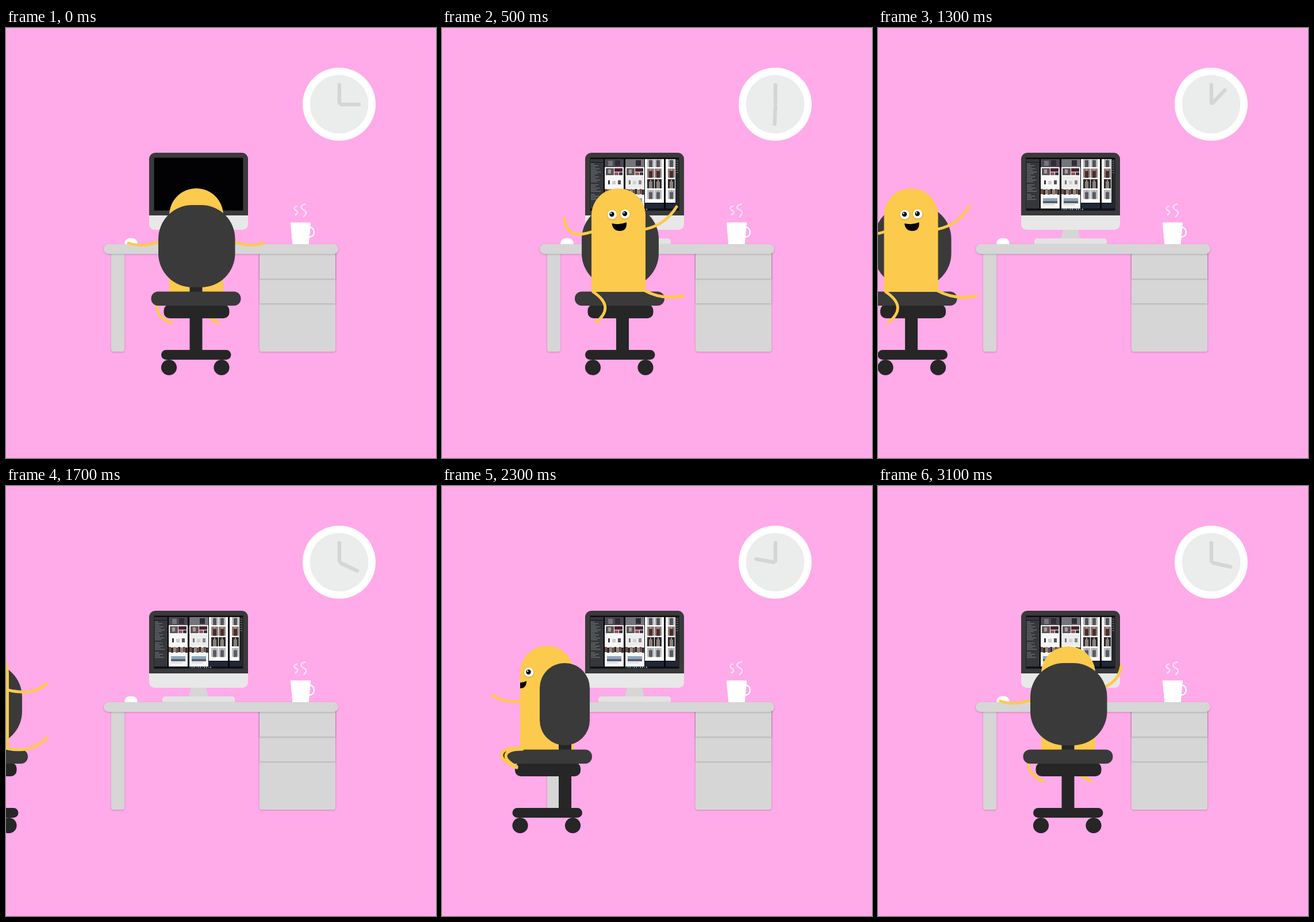
Animation of 748 by 748 pixels, one loop 3200 ms. Source, as an HTML page:

```html
<!DOCTYPE html>
<html lang="en">
<head>
<meta charset="utf-8">
<title>Leaving the desk</title>
<style>
  html, body { margin: 0; height: 100%; overflow: hidden; background: #ffaae9; }
  svg { display: block; }
  #stage { width: 100%; height: 100%; }
  .shadow { filter: drop-shadow(0 1.5px 1.5px rgba(0, 0, 0, .22)); }
  .grey { fill: #d6d6d6; }
  .dark { fill: #3a3a3a; }
  .black { fill: #262626; }
  .skin { fill: #fcca4c; }
  .limb { fill: none; stroke: #fcca4c; stroke-width: 5; stroke-linecap: round; }
  .hand { stroke: #d5d5d5; stroke-width: 6.5; stroke-linecap: round; }
  .steam { fill: none; stroke: #fff; stroke-opacity: .6; stroke-width: 2.6; stroke-linecap: round; }
</style>
</head>
<body>
<svg id="stage" viewBox="0 0 748 748">
  <defs>
    <g id="base" class="black">
      <rect x="-56" y="481" width="114" height="24" rx="10"/>
      <rect x="-60.5" y="560" width="121.5" height="17" rx="8.5"/>
      <circle cx="-47" cy="590.5" r="13.6"/>
      <circle cx="44.5" cy="590.5" r="13.6"/>
    </g>
    <g id="eye">
      <circle r="8" fill="#fff" class="shadow"/>
      <circle cx="-.5" cy="-.5" r="4.2"/>
      <circle cx="-2" cy="-2" r="1.3" fill="#fff"/>
    </g>
  </defs>

  <!-- clock -->
  <circle cx="579.5" cy="132.5" r="63.5" fill="#fff"/>
  <circle cx="579.5" cy="132.5" r="50.8" fill="#ebecec"/>
  <path class="hand" d="M580 99V130"/>
  <path class="hand" id="hour" d="M580 130V99"/>

  <!-- monitor -->
  <rect class="dark" x="249" y="217" width="172" height="130" rx="11"/>
  <path d="M249 326H421V340Q421 351 410 351H260Q249 351 249 340Z" fill="#e8e8e8"/>
  <path d="M322 351H348L352 367H318Z" fill="#d6d6d6"/>
  <rect x="272" y="366" width="126" height="14" rx="5" fill="#e3e3e3"/>
  <rect x="257.5" y="225.5" width="155" height="92" rx="1" fill="#020204" stroke="#222"/>
  <svg id="screen" x="258" y="226" width="154" height="91"></svg>

  <!-- desk, mouse and cup -->
  <path d="M206 377Q206 365.500 217.500 365.500T229 377Z" fill="#fff"/>
  <rect class="grey shadow" x="183" y="385" width="23" height="178" rx="4"/>
  <rect class="grey shadow" x="441" y="385" width="132" height="178" rx="4"/>
  <rect class="grey shadow" x="441" y="385" width="132" height="94"/>
  <rect class="grey shadow" x="441" y="385" width="132" height="51"/>
  <rect class="grey shadow" x="170" y="376" width="408" height="17" rx="8.5"/>
  <path d="M495 338.500H530L526.500 376H498.500Z" fill="#fff"/>
  <ellipse cx="528.500" cy="355" rx="7.5" ry="8.5" fill="none" stroke="#fff" stroke-width="2.4"/>
  <path d="M495 338.500H530L526.500 376H498.500Z" fill="#fff"/>
  <path class="steam" d="M506 310C501 311 500 315 504 317S509 322 503.500 325"/>
  <path class="steam" d="M521 306.500C513 307 511 313 517 316S524 322 518 328"/>

  <g id="back">
    <path class="limb" d="M262 484Q263 504 287 513M354 504L369 513"/>
    <path class="skin" d="M284 459V326A47 47 0 0 1 378 326V459Z"/>
    <path class="limb" d="M268 371Q240 383 213 374"/>
    <path class="limb" id="rightArm"/>
    <rect class="black" x="319.500" y="448" width="22" height="115"/>
    <rect class="dark" x="265" y="308" width="133.500" height="143" rx="59"/>
    <use href="#base" x="330.5"/>
    <rect class="dark" x="252.500" y="458.500" width="156" height="24.500" rx="12"/>
  </g>

  <g id="front">
    <rect class="dark" x="243" y="308" width="134" height="143" rx="59"/>
    <rect class="black" id="frontPole" y="448" width="22" height="115"/>
    <use href="#base" x="309.5"/>
    <rect class="dark" x="231" y="458.500" width="156" height="24.500" rx="12"/>
    <path class="skin" d="M260 459V326A47 47 0 0 1 354 326V459Z"/>
    <path class="limb" id="frontLimbs"/>
    <use href="#eye" x="296" y="324.500"/>
    <use href="#eye" x="318.500" y="323.500"/>
    <path d="M295.500 340Q309 343 321 338Q322 353 309.500 353Q297 353 295.500 340Z"/>
  </g>

  <g id="side">
    <path class="limb" d="M138 375Q109 378 88 364"/>
    <path class="skin" d="M136 465V324.500A46.500 46.500 0 0 1 229 324.500V465Z"/>
    <use href="#eye" x="151" y="324"/>
    <path d="M136 342Q142 342 147 339Q147 352 136 352Z"/>
    <rect class="black" x="203" y="448" width="22" height="115"/>
    <rect class="dark" x="170" y="308" width="87" height="143" rx="43.500"/>
    <use href="#base" x="183"/>
    <rect class="dark" x="106" y="458.500" width="155" height="24.500" rx="12"/>
    <path class="limb" d="M140 456C92 454 94 475 130 490M140 458C106 457 101 474 130 488"/>
  </g>
</svg>

<script>
const byId = id => document.getElementById(id);

// Design software on the monitor, in coordinates of the screen
function screenArt() {
  let art = '';
  const box = (x, y, w, h, fill) => {
    art += `<rect x="${x}" y="${y}" width="${w}" height="${h}" fill="${fill}"/>`;
  };
  box(0, 1, 23, 87, '#35373b');
  box(0, 7, 23, 1, '#17181a');
  for (let i = 0; i < 23; i++) {
    if (i === 12 || i === 18) continue;
    box(1, 10 + i * 2.8, 6 + (i * 7) % 12, 1, '#7e8185');
  }
  box(148, 1, 6, 87, '#25272b');
  for (let i = 0; i < 6; i++) box(149, 5 + i * 4, 4, 1, '#777');

  const page = (x, photo) => {
    box(x, 2, 33, 86, '#f7f7f7');
    box(x, 2, 33, 14, photo);
    box(x + 6, 5, 8, 9, '#77737a');
    box(x + 18, 4, 9, 10, '#302d35');
    box(x + 2, 18, 14, 12, '#57565c');
    box(x + 6, 20, 5, 7, '#b29a92');
    box(x + 17, 18, 14, 6, '#4c2434');
    box(x + 17, 25, 7, 5, '#99555b');
    box(x + 25, 25, 6, 5, '#333744');
    box(x + 6, 39, 3, 7, '#35353b');
    box(x + 13, 40, 6, 6, '#ccc');
    box(x + 23, 39, 5, 7, '#51515a');
    for (let i = 0; i < 8; i++)
      box(x + i * 4.1, 54 + i % 2, 4, 9, ['#6c4d44', '#292a32', '#9b8172'][i % 3]);
    box(x + 4, 70, 25, 9, '#8ea6bd');
    box(x + 4, 75, 25, 4, '#59606b');
    box(x + 4, 81, 20, 1, '#bbb');
  };
  page(25, '#4d4853');
  page(61, '#77747c');
  box(61, 32, 33, 20, '#d9d9d966');

  const shop = (x, width, columns) => {
    box(x, 2, width, 76, '#fff');
    box(x, 79, width, 9, '#202838');
    const tones = ['#b7b9bc', '#8b7c78', '#292a2b', '#b8bdc1'];
    tones.forEach((tone, row) => {
      for (let column = 0; column < columns; column++) {
        const left = x + 4 + column * 13, top = 18.5 * row;
        box(left, top, 12, 16, tone);
        box(left + 3, top + 4, 6, 12, ['#55535a', '#4a2b2b', '#8a817b', '#5b5a61'][row]);
        box(left + 5, top + 1, 2, 3, '#bb9486');
      }
    });
  };
  shop(95, 33, 2);
  shop(131, 17, 1);
  box(0, 0, 154, 2, '#0b0c0f');
  box(0, 88, 154, 3, '#0b1018');
  for (let i = 0; i < 11; i++) box(61 + i * 3.6, 88.5, 2, 2, i % 3 ? '#a9b6c4' : '#3b6c9d');
  return art;
}
byId('screen').innerHTML = screenArt();

const homes = { back: 330.5, front: 309.5, side: 183 };
const armDown = 'M396 371Q425 383 448 374';
const armUp = 'M396 349Q419 338 423 314';
const leftLimbs = 'M262 354Q217 370 213 331M263 459Q302 485 268 512';
const waveHigh = leftLimbs + 'M353 350Q388 343 408 311M353 457Q385 474 420 466';
const waveLow = leftLimbs + 'M353 355Q394 365 420 344M353 457Q394 465 420 438';

// One entry per step of the way out; the way back runs in reverse
const turns = 'bbbssffffsssfffff';
const views = { b: 'back', f: 'front', s: 'side' };
const chairX = [330.5, 330.5, 330.5, 324, 317, 309.5, 293.5, 266, 235,
  183, 154, 126, 97, 60, 10, -39.5, -89];
const hourAngle = [90, 103, 124, 143, 162, 182, 206, 231, 256,
  280, 306, 332, 360, 403, 439, 475, 511];
const STEP = 100, LAST = 16;

function draw(time) {
  const tick = Math.floor(time / STEP) % (2 * LAST);
  const step = Math.min(tick, 2 * LAST - tick);
  const view = views[turns[step]];
  for (const name in homes) {
    const group = byId(name);
    group.style.display = name === view ? '' : 'none';
    group.setAttribute('transform', `translate(${chairX[step] - homes[name]})`);
  }
  byId('rightArm').setAttribute('d', step === 1 ? armUp : armDown);
  byId('frontLimbs').setAttribute('d', step === 7 || step > 13 ? waveLow : waveHigh);
  // The pole swings to the other side after the second turn
  byId('frontPole').setAttribute('x', step > 9 ? 296.5 : 303);
  byId('screen').style.display = step ? '' : 'none';
  byId('hour').setAttribute('transform', `rotate(${hourAngle[step]} 580 133)`);
}

const start = performance.now();
function loop() {
  draw(performance.now() - start);
  requestAnimationFrame(loop);
}
loop();
</script>
</body>
</html>
```
